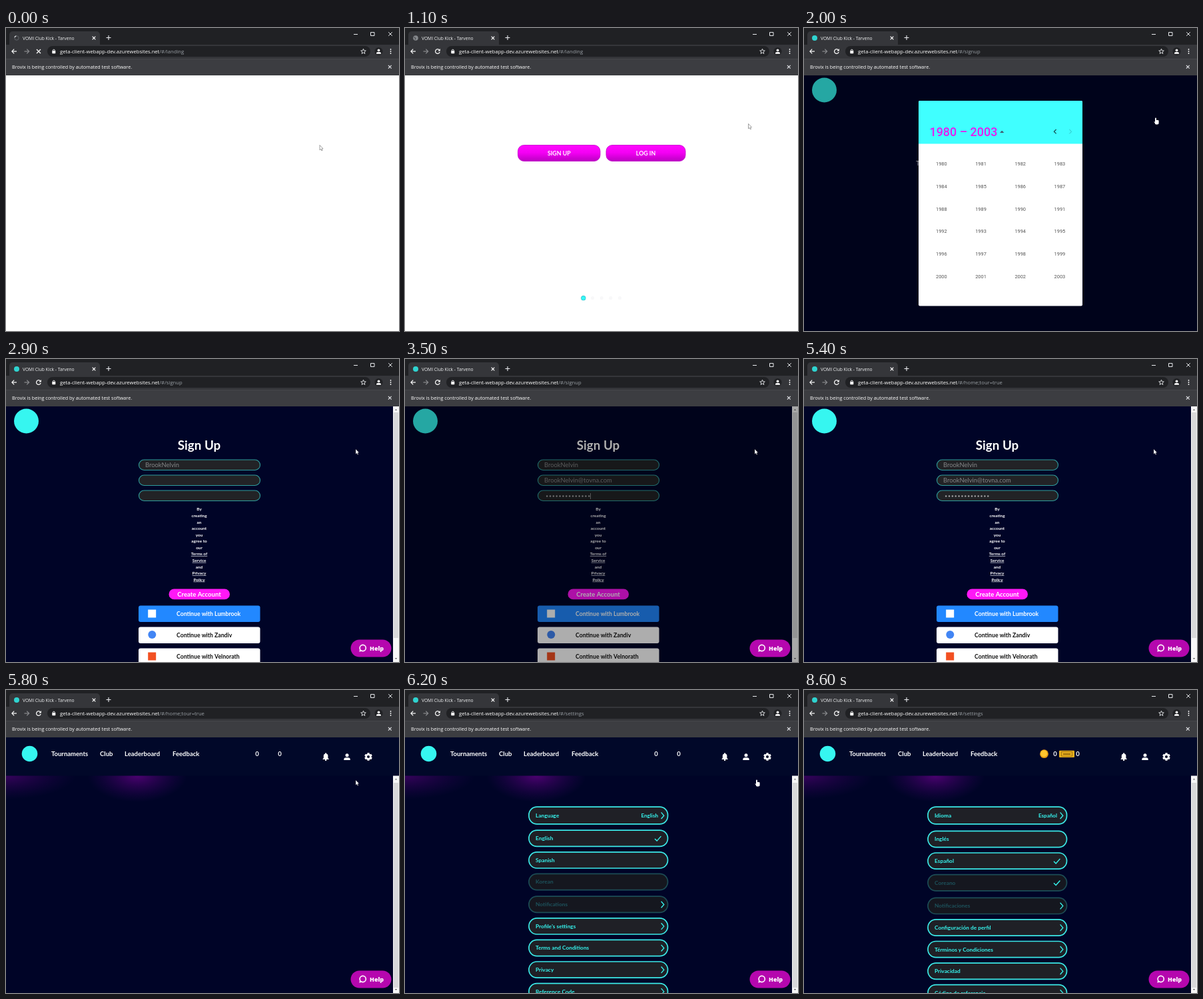
Recreate the animation shown at these times as an HTML page with a canvas. Size 590 by 454 pixels, loop 8700 ms.

```html
<!DOCTYPE html>
<html lang="en">
<head>
<meta charset="utf-8">
<title>Browser test run</title>
<style>
html, body { margin: 0; width: 100%; height: 100%; overflow: hidden; background: #fff; }
canvas { display: block; width: 590px; height: 454px; }
</style>
</head>
<body>
<canvas id="stage"></canvas>
<script>
const W = 590, H = 454, LOOP = 8700, STEP = 100;
const canvas = document.getElementById('stage');
const c = canvas.getContext('2d');
const ratio = window.devicePixelRatio || 1;
canvas.width = W * ratio;
canvas.height = H * ratio;

const UI = '"Open Sans", sans-serif';
const PAGE = 'Lato, sans-serif';
const ROBOTO = 'Roboto, sans-serif';
const CYAN = '#36f6f0', NAVY = '#000427';

// Scene starts, in ms
const AT = { landing: 1000, signup: 1400, picker: 1800, form: 2700, dim: 3400,
             undim: 5200, tour: 5300, home: 5500, settings: 5900, coins: 6500,
             spanish: 6900, hidden: 7700 };

const USER = 'BrookNelvin', MAIL = USER + '@tovna.com';

function text(s, x, y, size, color, o = {}) {
  c.font = `${o.weight || 400} ${size}px ${o.font || PAGE}`;
  c.textAlign = o.align || 'left';
  c.fillStyle = color;
  c.fillText(s, x, y);
  return c.measureText(s).width;
}

function box(x, y, w, h, r, fill, stroke, line = 1) {
  c.beginPath();
  c.roundRect(x, y, w, h, r);
  if (fill) { c.fillStyle = fill; c.fill(); }
  if (stroke) { c.strokeStyle = stroke; c.lineWidth = line; c.stroke(); }
}

function disc(x, y, r, fill) {
  c.beginPath();
  c.arc(x, y, r, 0, 7);
  c.fillStyle = fill;
  c.fill();
}

function path(points, color, line = 1, fill) {
  c.beginPath();
  for (let i = 0; i < points.length; i += 2) c.lineTo(points[i], points[i + 1]);
  if (fill) { c.closePath(); c.fillStyle = fill; c.fill(); }
  if (color) { c.strokeStyle = color; c.lineWidth = line; c.stroke(); }
}

function arc(x, y, r, from, to, color, line) {
  c.beginPath();
  c.arc(x, y, r, from, to);
  c.strokeStyle = color;
  c.lineWidth = line;
  c.stroke();
}

function cross(x, y, r, color, line = 1) {
  path([x - r, y - r, x + r, y + r], color, line);
  path([x + r, y - r, x - r, y + r], color, line);
}

function arrow(x, y, dir, color) {
  path([x - 3.5, y, x + 3.5, y], color, 1.2);
  path([x + .3 * dir, y - 3.4, x + 3.6 * dir, y, x + .3 * dir, y + 3.4], color, 1.2);
}

function person(x, y, s = 1) {
  disc(x, y - 2.3 * s, 2.5 * s, '#fff');
  box(x - 4.8 * s, y + 1.2 * s, 9.6 * s, 3.8 * s, [3.4 * s, 3.4 * s, .5, .5], '#fff');
}

function browser(t) {
  const ui = { font: UI, weight: 500 };
  box(0, 0, W, 26, 0, '#202124');
  box(5, 5, 136, 22, [5, 5, 0, 0], '#35363a');
  box(0, 25, W, 22, 0, '#35363a');
  box(0, 46, W, 25, 0, '#3c3d41');
  box(0, 46, W, 1, 0, '#46474b');

  // tab
  if (t < AT.landing) {
    const a = t / 140 + 3.4;
    arc(16, 15, 3.2, 0, 7, '#5f6368', 1);
    arc(16, 15, 3.2, a, a + 1.1, '#dfe1e5', 1.2);
  } else if (t < AT.signup) {
    disc(16, 15, 3.8, '#85888c');
    path([13.5, 13.5, 16, 15.5, 15, 17.5], '#4a4b4f', 1.1);
  } else disc(16, 15, 4, '#2fd3d0');
  text('VOMI Club Kick - Tarveno', 25, 17.5, 6.7, '#f1f3f4', ui);
  cross(132, 15, 2.3, '#fff', 1.2);
  path([150.5, 14.5, 157.5, 14.5], '#e8eaed', 1.1);
  path([154, 11, 154, 18], '#e8eaed', 1.1);

  // window controls
  path([522, 9.5, 528, 9.5], '#e8eaed', 1);
  box(547.5, 6.5, 5.5, 5, 0, null, '#e8eaed');
  cross(577, 9, 2.8, '#e8eaed');

  // toolbar
  arrow(12.5, 35, -1, '#fff');
  arrow(31, 35, 1, '#8b8c8f');
  if (t < 900) cross(49, 35, 3, '#fff', 1.2);
  else {
    arc(49, 35, 3.3, .3, 5.5, '#fff', 1.2);
    path([52.9, 31, 52.9, 34.6, 49.4, 34.6], null, 0, '#fff');
  }
  box(62, 27, 485, 16, 8, '#202124');
  box(69.3, 34, 5, 4.2, .6, '#fff');
  arc(71.8, 33.8, 1.6, Math.PI, 0, '#fff', .9);
  const route = t < AT.signup ? 'landing' : t < AT.tour ? 'signup'
    : t < AT.settings ? 'home;tour=true' : 'settings';
  const w = text('geta-client-webapp-dev.azurewebsites.net', 81, 37.8, 7.65, '#fff', ui);
  text('/#/' + route, 81 + w, 37.8, 7.65, '#9aa0a6', ui);
  const star = [];
  for (let i = 0; i <= 10; i++) {
    const r = i % 2 ? 1.7 : 4, a = i * Math.PI / 5 - Math.PI / 2;
    star.push(536.5 + r * Math.cos(a), 35.2 + r * Math.sin(a));
  }
  path(star, '#e8eaed', .9);
  disc(559.5, 35, 6, '#202124');
  person(559.5, 35, .75);
  for (const y of [32, 35, 38]) disc(577.5, y, .9, '#fff');

  // notice bar
  text('Brovix is being controlled by automated test software.', 9, 60.8, 7.2, '#fff', ui);
  cross(576.3, 58.2, 2.4, '#e8eaed', 1.1);
}

function landing() {
  const g = c.createLinearGradient(0, 176, 0, 200);
  g.addColorStop(0, '#ff08ff');
  g.addColorStop(.45, '#f400f4');
  g.addColorStop(1, '#b800c0');
  for (const [x, w, s] of [[169.5, 123.5, 'SIGN UP'], [302, 119, 'LOG IN']]) {
    box(x, 175.5, w, 24, 9, g, '#c000c8', .8);
    text(s, x + w / 2, 190.5, 8.8, '#fff', { weight: 700, align: 'center' });
  }
  for (let i = 1; i < 5; i++) disc(268 + i * 13.6, 404.5, 2.6, '#f8f8f9');
  disc(267.8, 404.7, 3.6, '#2bb9c4');
  disc(267.8, 404.7, 3, '#36f6f6');
}

function night() {
  box(0, 71, W, H - 71, 0, NAVY);
}

function shade() {
  box(0, 71, W, H - 71, 0, 'rgba(0,0,0,.32)');
}

function logo() {
  disc(30.5, 93, 18.5, CYAN);
}

function picker() {
  box(172, 109, 246, 307.5, 2, '#fff');
  box(172, 109, 246, 64.5, [2, 2, 0, 0], '#40ffff');
  text('1980 – 2003', 188.5, 161.5, 17.9, '#e61cf0', { weight: 500, font: ROBOTO });
  path([294, 157, 297.2, 153.8, 300.4, 157], null, 0, '#42566b');
  path([378.6, 152, 375.4, 155.2, 378.6, 158.4], '#12484c', 1.2);
  path([398.4, 152, 401.6, 155.2, 398.4, 158.4], '#30bcbf', 1);
  for (let i = 0; i < 24; i++) {
    text(1980 + i, 206.3 + 59.2 * (i % 4), 206.2 + 33.75 * Math.floor(i / 4), 7.4, '#555',
      { font: ROBOTO, align: 'center' });
  }
}

function scrollbar(top, thumb, end) {
  box(581, top, 9, H - top, 0, '#f7f7f7');
  box(582, thumb, 7, end - thumb, 0, '#d8d8da');
  path([583.8, top + 6, 585.5, top + 4, 587.2, top + 6], null, 0, '#777');
  path([583.8, 448, 585.5, 450, 587.2, 448], null, 0, '#666');
}

function help() {
  box(517.5, 420.5, 61, 26, 13, '#b507ae');
  arc(535.7, 433, 4.6, 0, 7, '#fff', 1.6);
  path([531, 435, 530.4, 438.8, 534.6, 437.6], null, 0, '#fff');
  text('Help', 546, 436.6, 9, '#fff', { weight: 800, font: UI });
}

function typed(s, t, from, to) {
  const p = Math.max(0, Math.min(1, (t - from) / (to - from)));
  return s.slice(0, Math.round(s.length * p));
}

function form(t) {
  text('Sign Up', 290, 136, 18.8, '#fff', { weight: 700, align: 'center' });
  for (let i = 0; i < 3; i++) box(199.5, 151 + 23 * i, 182, 15.5, 7.8, '#222326', '#2f9c9c', 1.1);
  text(typed(USER, t, 2700, 2900), 209, 162.2, 9.4, '#858688');
  text(typed(MAIL, t, 2900, 3100), 209, 185.2, 9.4, '#858688');
  const n = typed('x'.repeat(14), t, 3100, 3300).length;
  for (let i = 0; i < n; i++) disc(213.2 + 4.85 * i, 205.6, 1.25, '#a0a0a2');
  if (t < 3700 && t >= 3100) box(213 + 4.65 * n, 201, .7, 9, 0, '#aaa');

  const terms = 'By|creating|an|account|you|agree to|our|Terms of|Service|and|Privacy|Policy'.split('|');
  terms.forEach((s, i) => {
    const y = 227.4 + 9.58 * i;
    const w = text(s, 290, y, 6.4, '#fff', { align: 'center', weight: 700 });
    if (i > 6 && i !== 9) box(290 - w / 2, y + .8, w, .6, 0, '#fff');
  });

  box(244.5, 344.5, 91.5, 15.8, 7.9, '#ff18f6');
  text('Create Account', 290, 355.6, 9.5, '#fff', { weight: 700, align: 'center' });
  const ways = [['Lumbrook', '#2288ff', '#fff'], ['Zandiv', '#fff', '#111'], ['Velnorath', '#fff', '#111']];
  ways.forEach(([name, back, ink], i) => {
    const y = 369.5 + 32 * i;
    box(199, y, 182.5, 24.5, 3, back);
    if (i === 1) disc(219.3, y + 11.5, 6, '#4285f4');
    else box(213.2, y + 6, 12, 12, 0, i ? '#f25022' : '#fff');
    text('Continue with ' + name, 256, y + 15.2, 8.7, ink, { weight: 700 });
  });
  scrollbar(71, 80, 418);
}

function glow(x, rx, ry, alpha) {
  c.save();
  c.translate(x, 128);
  c.scale(rx, ry);
  const g = c.createRadialGradient(0, 0, 0, 0, 0, 1);
  g.addColorStop(0, `rgba(110,0,145,${alpha})`);
  g.addColorStop(.5, `rgba(85,0,125,${alpha * .5})`);
  g.addColorStop(1, 'rgba(60,0,110,0)');
  c.fillStyle = g;
  c.fillRect(-1, 0, 2, 1);
  c.restore();
}

function header(t) {
  box(0, 71, W, 57.5, 0, '#010829');
  disc(35.5, 95.5, 11.8, CYAN);
  [['Tournaments', 68], ['Club', 141], ['Leaderboard', 178], ['Feedback', 250]]
    .forEach(([s, x]) => text(s, x, 99, 9.5, '#fff', { weight: 700 }));
  for (const x of [377, 411]) text('0', x, 99, 9.5, '#fff', { weight: 700, align: 'center' });
  if (t >= AT.coins) {
    disc(360.5, 95.7, 6.4, '#e59a12');
    disc(360.2, 95.3, 5, '#ffc62e');
    box(383, 90.7, 23, 10.3, 1, '#e8ae1c');
    box(386.5, 92.5, 16, 6.7, 0, null, '#8a6010', .7);
    path([389, 96, 400, 96], '#7a5208', 1.4);
  }

  // bell, profile, gear
  box(476.8, 95.5, 6.6, 7.5, [3.3, 3.3, 0, 0], '#fff');
  path([476.8, 102, 483.4, 102, 485, 104, 475.2, 104], null, 0, '#fff');
  disc(480.1, 95.4, 1.1, '#fff');
  disc(480.1, 105, 1.2, '#fff');
  person(512, 100);
  for (let i = 0; i < 3; i++) {
    const a = i * Math.PI / 3 + Math.PI / 2, dx = 5.8 * Math.cos(a), dy = 5.8 * Math.sin(a);
    path([544 - dx, 100 - dy, 544 + dx, 100 + dy], '#fff', 3.2);
  }
  disc(544, 100, 4.6, '#fff');
  disc(544, 100, 2, '#010829');
}

const LABELS = {
  en: ['Language', 'English', 'Spanish', 'Korean', 'Notifications', "Profile's settings",
       'Terms and Conditions', 'Privacy', 'Reference Code'],
  es: ['Idioma', 'Inglés', 'Español', 'Coreano', 'Notificaciones', 'Configuración de perfil',
       'Términos y Condiciones', 'Privacidad', 'Código de referencia']
};

function settings(t) {
  const es = t >= AT.spanish;
  const checked = es ? [2, 3] : [1];
  const first = es ? 223.5 : 222.3, gap = es ? 2.1 : 1.2;
  LABELS[es ? 'es' : 'en'].forEach((s, i) => {
    // the language list sits a little apart from the rows below it
    const y = i ? first + 32.6 * (i - 1) + (i > 3 ? gap : 0) : 188;
    const h = i ? 24.2 : 25.6;
    const off = i === 3 || i === 4;
    box(186, y - h / 2, 208.5, h, 12, off ? '#15171f' : '#1f2026', off ? '#1c4c55' : '#3be8e6', 1.7);
    text(s, 196, y + 2.9, 8.35, off ? '#1d525c' : CYAN, { weight: 700 });
    if (!i) text(es ? 'Español' : 'English', 380, y + 2.9, 8.1, CYAN, { align: 'right', weight: 700 });
    if (!i || i > 3) path([384.6, y - 4.6, 388.8, y + .2, 384.6, y + 5], CYAN, 1.3);
    if (checked.includes(i)) path([375, y + .6, 378.2, y + 3.8, 384.4, y - 3.2], CYAN, 1.4);
  });
}

function pointer(t) {
  if (t >= AT.hidden) return;
  const hand = (t >= AT.signup && t < AT.form) || t >= AT.settings;
  // three stops: rest, on the way, settled
  const p = Math.max(0, Math.min(1, (t - 900) / 200)), q = Math.max(0, Math.min(1, (t - 1100) / 200));
  c.save();
  c.translate(471 + 44.5 * p + 9.5 * q, 175.5 - 32 * p - 8.5 * q);
  if (hand) {
    box(2, -.5, 1.9, 7, .9, '#fff');
    box(2, 3.1, 5.6, 6.4, [1, 1.4, 2, 2], '#fff');
    path([.2, 5.1, 2.4, 6.1, 4, 9.5, 2.6, 8.9], null, 0, '#fff');
  } else {
    const light = t < AT.signup;
    path([0, 0, 0, 7.4, 1.7, 5.9, 2.9, 8.4, 4, 7.9, 2.9, 5.5, 5, 5.3, 0, 0],
      light ? '#777' : '#222', light ? .7 : .3, '#fff');
  }
  c.restore();
}

function draw(t) {
  c.setTransform(ratio, 0, 0, ratio, 0, 0);
  box(0, 0, W, H, 0, '#fff');
  if (t >= AT.landing && t < AT.signup) landing();
  if (t >= AT.signup && t < AT.home) {
    night();
    logo();
    if (t < AT.form) {
      text('T', 168.2, 205.5, 9, '#fff');
      if (t >= AT.picker) { shade(); picker(); }
    } else {
      form(t);
      if (t >= AT.dim && t < AT.undim) shade();
      help();
    }
  }
  if (t >= AT.home) {
    night();
    glow(0, 105, 36, .5);
    glow(197, 75, 40, .7);
    header(t);
    if (t >= AT.settings) settings(t);
    scrollbar(128.5, 139, 446);
    help();
  }
  browser(t);
  pointer(t);
}

const start = performance.now();
function tick(now) {
  const t = Math.max(0, now - start) % LOOP;
  draw(Math.floor(t / STEP) * STEP);
  requestAnimationFrame(tick);
}
draw(0);
requestAnimationFrame(tick);
</script>
</body>
</html>
```
